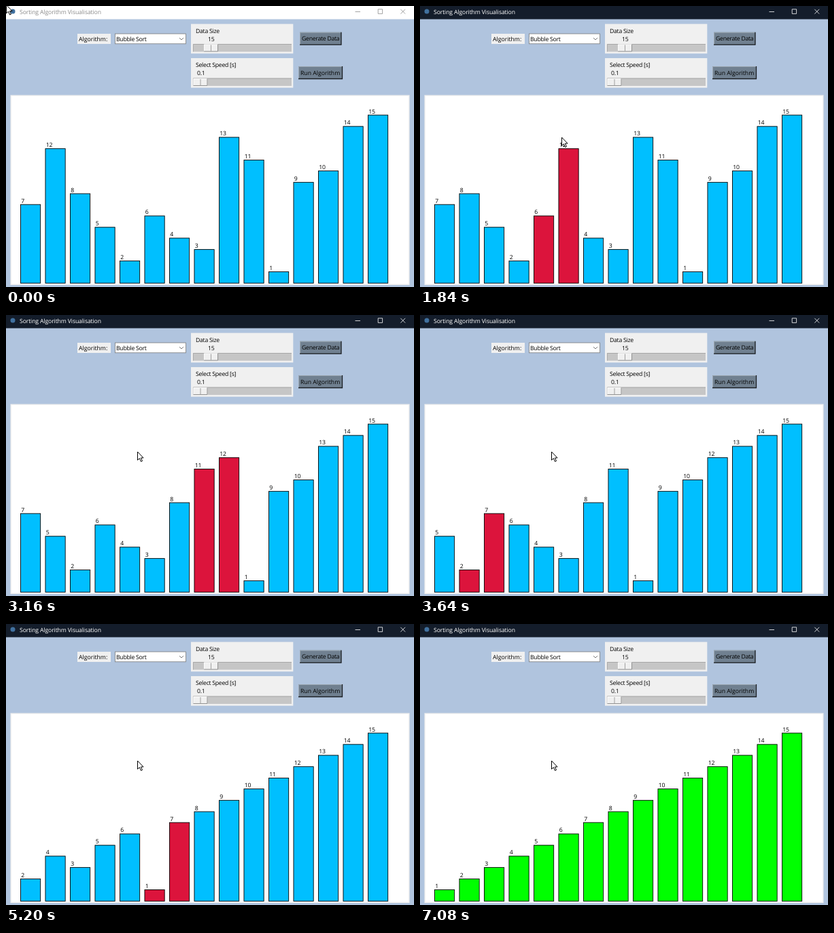
Animation of 600x415 px, one loop 7.16 s. Source, as an HTML page:

```html
<!DOCTYPE html>
<html lang="en">
<head>
<meta charset="utf-8">
<title>Sorting Algorithm Visualisation</title>
<style>
  html, body { margin: 0; width: 100%; height: 100%; overflow: hidden; background: #b0c4de; }
  svg { display: block; width: 600px; height: 415px; }
  text {
    font-family: "Open Sans", "Noto Sans", sans-serif; font-size: 8.7px; letter-spacing: -.27px;
    fill: #000; text-rendering: geometricPrecision;
  }
  .loose { letter-spacing: 0; }
  .face { fill: #f0f0f0; }
  .trough { fill: #c6c6c6; }
  .button { fill: #708090; }
  .lit, .shade, .glyph { fill: none; stroke: #fff; stroke-width: .8; }
  .lit.dim { stroke: #a9b3bd; }
  .shade { stroke: #7a7a7a; }
  .shade.dark { stroke: #1c2024; stroke-width: 1.3; }
  #title { --bar: #fff; --ink: #8c8c8c; --sign: #8c8c8c; }
  #title.active { --bar: #141d2b; --ink: #fff; --sign: #fff; }
  #title rect { fill: var(--bar); }
  #title text { fill: var(--ink); letter-spacing: -.14px; }
  #title .glyph { stroke: var(--sign); }
  #bars rect { stroke: #000; stroke-width: .9; }
</style>
</head>
<body>
<svg viewBox="0 0 600 415">
  <rect width="600" height="415" fill="#b0c4de"/>

  <g id="title">
    <rect width="600" height="19.5"/>
    <circle cx="10" cy="8" r="3.5" fill="#41719f"/>
    <text x="20" y="12">Sorting Algorithm Visualisation</text>
    <path class="glyph" d="M513.5 8.5h7.5M547.2 4.8h6.4v6.6h-6.4zM580.3 4.8l6.8 6.8m0-6.8l-6.8 6.8"/>
  </g>

  <rect class="face" x="105" y="41" width="49" height="15"/>
  <text class="loose" x="107" y="52">Algorithm:</text>
  <rect x="160.4" y="41" width="104.2" height="14.8" fill="#fff" stroke="#7a7a7a" stroke-width=".8"/>
  <text x="162" y="51.8">Bubble Sort</text>
  <path d="M255 47l3 3 3-3" fill="none" stroke="#555" stroke-width=".8"/>

  <g id="scales"></g>
  <g id="buttons"></g>

  <rect class="face" x="6.5" y="131.5" width="587" height="280.5"/>
  <rect x="8" y="133" width="584" height="277.5" fill="#fff"/>
  <g id="bars"></g>

  <path id="cursor" d="M.5 .5v12.3l2.9-2.6 2.1 4.8 2-.9-2.1-4.6h3.7z" fill="#fff" stroke="#000"/>
</svg>
<script>
const LOOP = 7160, FOCUS = 1300, START = 1405, STEP = 111;
const BLUE = '#00bfff', RED = '#dc143c', GREEN = '#00ff00';
const find = id => document.getElementById(id);

function add(parent, tag, attrs, text = '') {
  const node = document.createElementNS('http://www.w3.org/2000/svg', tag);
  for (const key in attrs) node.setAttribute(key, attrs[key]);
  node.textContent = text;
  return parent.appendChild(node);
}

// Raised edge: light on the top left, dark on the bottom right.
function bevel(parent, x, y, w, h, lit = '', dark = '') {
  add(parent, 'path', { class: `lit ${lit}`, d: `M${x + .5} ${y + h}V${y + .5}H${x + w}` });
  add(parent, 'path', { class: `shade ${dark}`, d: `M${x} ${y + h - .5}H${x + w - .5}V${y}` });
}

function scale(y, label, value, valueX, knobX) {
  const g = find('scales');
  add(g, 'rect', { class: 'face', x: 272, y, width: 150.3, height: 43.7 });
  add(g, 'text', { x: 279, y: y + 13 }, label);
  add(g, 'text', { x: valueX, y: y + 25 }, value);
  add(g, 'rect', { class: 'trough', x: 275, y: y + 29.5, width: 145, height: 11.5 });
  add(g, 'path', { fill: 'none', stroke: '#a0a0a0', 'stroke-width': .8, d: `M275.4 ${y + 41}v-11H420` });
  add(g, 'rect', { class: 'face', x: knobX, y: y + 30, width: 21, height: 11 });
  bevel(g, knobX, y + 30, 21, 11);
  add(g, 'path', { stroke: '#8c8c8c', 'stroke-width': .8, d: `M${knobX + 10.5} ${y + 31}v9` });
}

function button(x, y, w, label, spacing) {
  const g = find('buttons');
  add(g, 'rect', { class: 'button', x, y, width: w, height: 19 });
  bevel(g, x, y, w, 19, 'dim', 'dark');
  add(g, 'text', { x: x + 3, y: y + 12.7, class: spacing }, label);
}

scale(26.5, 'Data Size', '15', 297, 291);
scale(77, 'Select Speed [s]', '0.1', 281, 275.5);
button(432, 38.7, 61.4, 'Generate Data', '');
button(430, 89, 65, 'Run Algorithm', 'loose');

// Every swap of the bubble sort becomes one state; the last is the finished order.
function sortStates(data) {
  const states = [{ data: [...data], color: () => BLUE }];
  for (let end = data.length - 1; end > 0; end--) {
    for (let j = 0; j < end; j++) {
      if (data[j] <= data[j + 1]) continue;
      [data[j], data[j + 1]] = [data[j + 1], data[j]];
      states.push({ data: [...data], color: i => i === j || i === j + 1 ? RED : BLUE });
    }
  }
  states.push({ data: [...data], color: () => GREEN });
  return states;
}

const states = sortStates([7, 12, 8, 5, 2, 6, 4, 3, 13, 11, 1, 9, 10, 14, 15]);
// One slower redraw late in the run delays the rest.
const startOf = n => n ? START + STEP * (n - 1) + (n > 29 ? 45 : 0) : 0;

// The chart is laid out on an 800 by 380 canvas, shown at this zoom.
const ZOOM = .73, FLOOR = 380, TALLEST = 340;
const chartX = x => 6.5 + ZOOM * (x + .5);
const chartY = y => 131.5 + ZOOM * (y + .5);

const bars = states[0].data.map((_, i) => ({
  rect: add(find('bars'), 'rect', { x: chartX(50 * i + 20), width: 40 * ZOOM }),
  label: add(find('bars'), 'text', { x: chartX(50 * i + 21) })
}));

function drawBars({ data, color }) {
  bars.forEach(({ rect, label }, i) => {
    const height = Math.round(TALLEST * data[i] / data.length);
    const top = chartY(FLOOR - height);
    rect.setAttribute('y', top);
    rect.setAttribute('height', height * ZOOM);
    rect.setAttribute('fill', color(i));
    label.setAttribute('y', top - 2.5);
    label.textContent = data[i];
  });
}

// Pointer stops: time, x, y
const stops = [[0, 0, -2], [40, 0, -2], [1150, 462, 98], [1420, 462, 98],
               [1840, 208, 193.5], [2040, 193, 201.5], [LOOP, 193, 201.5]];

function pointerAt(t) {
  const k = stops.findIndex(s => s[0] > t);
  const [t0, x0, y0] = stops[k - 1], [t1, x1, y1] = stops[k];
  const p = (t - t0) / (t1 - t0), e = p * p * (3 - 2 * p);
  return [x0 + (x1 - x0) * e, y0 + (y1 - y0) * e];
}

let shown = -1;
function render(t) {
  let n = states.length - 1;
  while (startOf(n) > t) n--;
  if (n !== shown) drawBars(states[shown = n]);
  find('title').classList.toggle('active', t >= FOCUS);
  find('cursor').setAttribute('transform', `translate(${pointerAt(t)})`);
}

const begin = performance.now();
function tick() {
  render((performance.now() - begin) % LOOP);
  requestAnimationFrame(tick);
}
tick();
</script>
</body>
</html>
```
